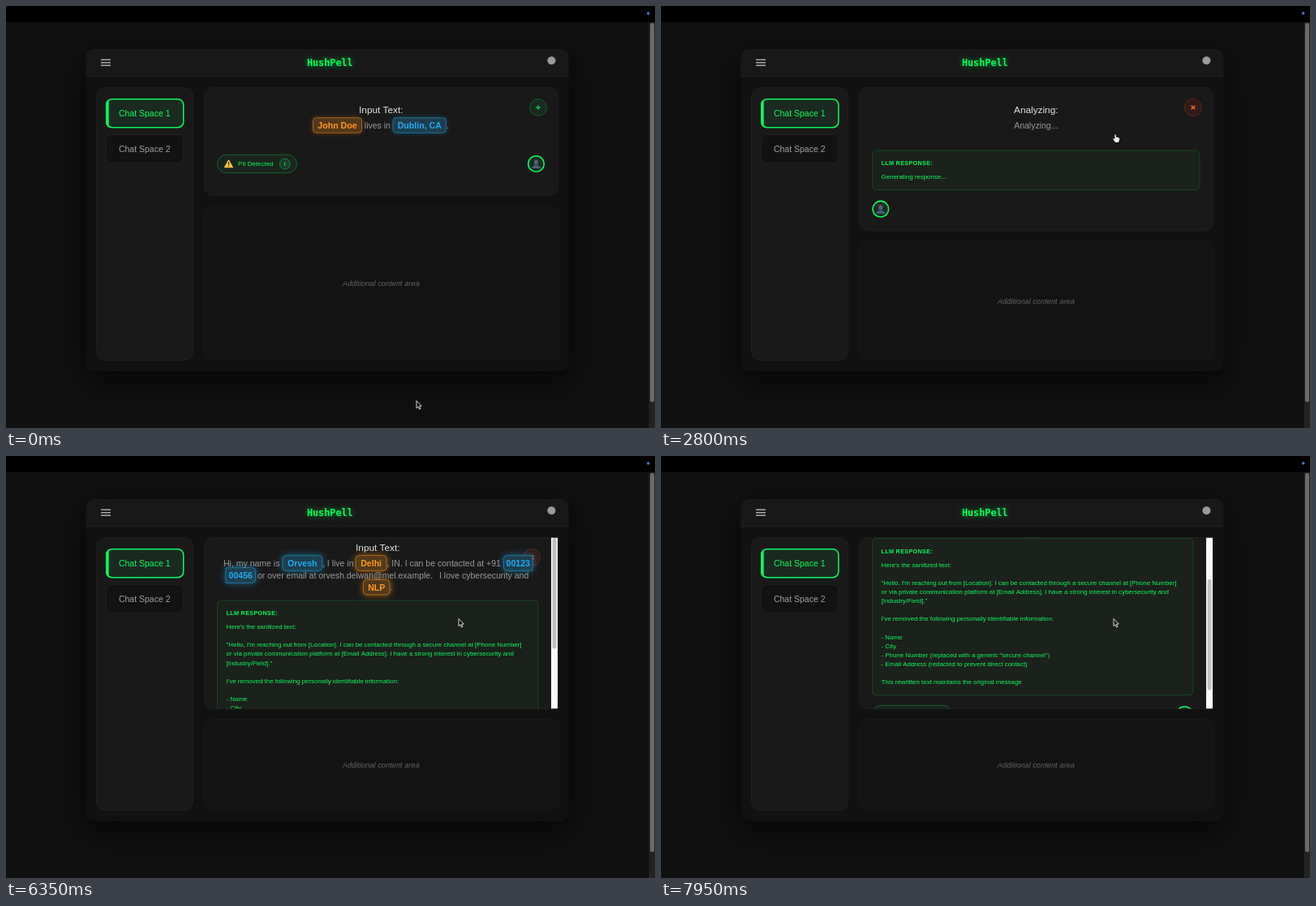
These frames come from a looping animation (800x520 px, 8 s). An HTML page with a canvas:

```html
<!DOCTYPE html>
<html lang="en">
<head>
<meta charset="utf-8">
<title>Privacy chat demo</title>
<style>
html, body { margin: 0; width: 100%; height: 100%; overflow: hidden; background: #101010; }
canvas { display: block; width: 800px; height: 520px; }
</style>
</head>
<body>
<canvas id="stage" width="800" height="520"></canvas>
<script>
const canvas = document.getElementById('stage');
const dpr = window.devicePixelRatio || 1;
canvas.width = 800 * dpr;
canvas.height = 520 * dpr;
const ctx = canvas.getContext('2d');

const LOOP = 8000, STEP = 50;
const FORM_AT = 1050, PASTE_AT = 2200, ANALYZE_AT = 2650, RESULT_AT = 5350;
const SCROLL_AT = 6400, SCROLL_END = 7850;
const SANS = '"Liberation Sans", Arial, sans-serif';
const MONO = '"DejaVu Sans Mono", monospace';
const GREEN = '#0cfa5c';
const green = a => `rgba(0,255,90,${a})`;
const ORANGE = [255, 152, 24], BLUE = [32, 172, 240];
const rgba = (c, a) => `rgba(${c},${a})`;

// Cursor stops: time, x, y
const PATH = [
  [50, 506, 486.5], [850, 656, 125], [1150, 656, 125], [1800, 516.5, 170],
  [2250, 560, 158], [3700, 560, 158], [4500, 558, 200.5]
];

const REPLY = [
  "Here's the sanitized text:", '',
  '"Hello, I\'m reaching out from [Location]. I can be contacted through a secure channel at [Phone Number]',
  'or via private communication platform at [Email Address]. I have a strong interest in cybersecurity and',
  '[Industry/Field]."', '',
  "I've removed the following personally identifiable information:", '',
  '- Name', '- City',
  '- Phone Number (replaced with a generic "secure channel")',
  '- Email Address (redacted to prevent direct contact)', '',
  'This rewritten text maintains the original message'
];

function box(x, y, w, h, r, fill, stroke, line = 1) {
  ctx.beginPath();
  ctx.roundRect(x, y, w, h, r);
  if (fill) { ctx.fillStyle = fill; ctx.fill(); }
  if (stroke) { ctx.strokeStyle = stroke; ctx.lineWidth = line; ctx.stroke(); }
}

function disc(x, y, r, fill, stroke, line = 1) {
  ctx.beginPath();
  ctx.arc(x, y, r, 0, Math.PI * 2);
  if (fill) { ctx.fillStyle = fill; ctx.fill(); }
  if (stroke) { ctx.strokeStyle = stroke; ctx.lineWidth = line; ctx.stroke(); }
}

// y is the middle of the capital letters
function text(str, x, y, size, color, { style = '', align = 'left', font = SANS, gap = 0 } = {}) {
  ctx.font = `${style} ${size}px ${font}`;
  ctx.letterSpacing = gap + 'px';
  ctx.textAlign = align;
  ctx.fillStyle = color;
  ctx.fillText(str, x, y + size * 0.36);
}

function glow(color, blur, draw) {
  ctx.save();
  ctx.shadowColor = color;
  ctx.shadowBlur = blur * dpr;
  draw();
  ctx.restore();
}

function lines(points, color, width) {
  ctx.beginPath();
  for (const [x1, y1, x2, y2] of points) { ctx.moveTo(x1, y1); ctx.lineTo(x2, y2); }
  ctx.strokeStyle = color;
  ctx.lineWidth = width;
  ctx.stroke();
}

function chip(str, left, right, y, color, strong, radii = 4) {
  const w = right - left;
  glow(rgba(color, strong ? 0.6 : 0.3), strong ? 10 : 7, () =>
    box(left, y - 9.3, w, 18.6, radii, strong ? '#1d1d1d' : '#1b1b1b'));
  box(left, y - 9.3, w, 18.6, radii, rgba(color, 0.24), rgba(color, 0.5));
  text(str, left + w / 2, y, 10.6, rgba(color, 1), { style: 'bold', align: 'center' });
}

function avatar(x, y) {
  disc(x, y, 9.8, '#1d2b24', GREEN, 1.6);
  ctx.fillStyle = '#4a6078';
  ctx.beginPath();
  ctx.ellipse(x, y - 2, 2.7, 3.3, 0, 0, Math.PI * 2);
  ctx.fill();
  ctx.beginPath();
  ctx.moveTo(x - 5.4, y + 5.6);
  ctx.quadraticCurveTo(x - 5, y + 2, x, y + 1.6);
  ctx.quadraticCurveTo(x + 5, y + 2, x + 5.4, y + 5.6);
  ctx.fill();
}

function badge(y) {
  box(260.5, y - 11.2, 98, 22.4, 11.2, '#1a251d', green(0.3));
  ctx.beginPath();
  ctx.moveTo(274.5, y - 4.4);
  ctx.lineTo(279.4, y + 4.2);
  ctx.lineTo(269.6, y + 4.2);
  ctx.closePath();
  ctx.lineJoin = 'round';
  ctx.fillStyle = ctx.strokeStyle = '#fbc63a';
  ctx.lineWidth = 1.2;
  ctx.fill();
  ctx.stroke();
  lines([[274.5, y - 2.2, 274.5, y + 1.4], [274.5, y + 2.4, 274.5, y + 3.6]], '#222', 1.2);
  text('PII Detected', 286, y, 7.9, GREEN);
  disc(343.8, y, 6.4, '#1d3a28', green(0.4));
  text('i', 343.8, y, 7.5, GREEN, { style: 'bold', align: 'center' });
}

function plusButton() {
  disc(656, 125, 10.4, '#1b2a20', green(0.28));
  lines([[653, 125, 659, 125], [656, 122, 656, 128]], GREEN, 1);
}

function closeButton(x) {
  disc(x, 125, 10.5, '#311a17', 'rgba(255,80,50,0.24)');
  lines([[x - 2.3, 122.7, x + 2.3, 127.3], [x + 2.3, 122.7, x - 2.3, 127.3]], '#e8702c', 1.5);
}

function backdrop() {
  ctx.fillStyle = '#101010';
  ctx.fillRect(0, 0, 800, 520);
  ctx.save();
  ctx.shadowColor = 'rgba(0,0,0,0.65)';
  ctx.shadowBlur = 40 * dpr;
  ctx.shadowOffsetY = 13 * dpr;
  box(98.5, 53, 595, 397, 10, '#111');
  ctx.restore();
  ctx.fillStyle = '#000';
  ctx.fillRect(0, 0, 800, 20);
  disc(791.7, 9, 1.8, '#4a72d8');
  ctx.fillStyle = '#232323';
  ctx.fillRect(792.5, 20, 7.5, 500);
  box(794, 21, 5, 467, 2.5, '#6a6a6a');

  box(98.5, 53, 595, 34, [10, 10, 0, 0], '#181818');
  lines([[98.5, 87, 693.5, 87]], '#202020', 1);
  lines([66.2, 69.7, 73.2].map(y => [117, y, 129, y]), '#a8a8a8', 1.4);
  glow(green(0.6), 7, () =>
    text('HushPell', 399.3, 69.8, 11.8, '#00ff5a', { style: 'bold', align: 'center', font: MONO }));
  disc(672.4, 67.3, 5, '#9a9a9a');
}

function sidebar() {
  box(111.5, 100.5, 119, 336, 10, '#191919', '#1e1e1e');
  box(123.8, 114.7, 95, 35, 7, '#1a2a20', GREEN, 1.5);
  ctx.save();
  ctx.beginPath();
  ctx.roundRect(123, 114, 96.5, 36.4, 7.5);
  ctx.clip();
  ctx.fillStyle = GREEN;
  ctx.fillRect(123, 114, 3.7, 37);
  ctx.restore();
  text('Chat Space 1', 170.7, 132.2, 10.5, GREEN, { align: 'center' });
  box(123.5, 158.5, 95, 35, 7, '#121212', '#1f1f1f');
  text('Chat Space 2', 170.7, 176, 10.5, '#a0a0a0', { align: 'center' });
}

function panels(bottom) {
  const top = bottom + 13;
  box(244.5, 100.5, 436, bottom - 100.5, 10, '#191919', '#1e1e1e');
  box(244.5, top, 436, 436.5 - top, 10, '#131313', '#181818');
  text('Additional content area', 462.3, (top + 436.5) / 2 + 0.2, 9.3, '#626262',
    { style: 'italic', align: 'center' });
}

function heading(str, x, y) {
  text(str, x, y, 11.8, '#e2e2e2', { align: 'center' });
}

function startView() {
  panels(233);
  heading('Input Text:', 462.3, 128);
  chip('John Doe', 378.5, 438.5, 147, ORANGE, false);
  text('lives in', 441.8, 147, 10.5, '#999');
  chip('Dublin, CA', 477, 542.5, 147, BLUE, false);
  text('.', 543, 147, 10.5, '#999');
  plusButton();
  badge(194.5);
  avatar(653.5, 194.5);
}

function formView(t) {
  panels(233);
  text('Enter text to analyze for PII:', 462.3, 124.2, 10.5, '#a0a0a0', { align: 'center' });
  box(330.5, 143.5, 207, 25, 5, '#1f2420', green(0.7));
  ctx.save();
  ctx.beginPath();
  ctx.rect(339.5, 144, 188.5, 24);
  ctx.clip();
  if (t < PASTE_AT) text("Hi, I'm John Doe from New York. Call me at 555", 339.5, 156.2, 9.2, '#8d918e');
  else text('delwan@mel.example. I love cybersecurity and NLP.', 527.5, 156.2, 9.2, '#e2e2e2', { align: 'right' });
  ctx.restore();
  box(545.7, 143.8, 48.6, 24.4, 5, '#00ff5c');
  text('Send', 570, 156.2, 9.2, '#0c1a10', { style: 'bold', align: 'center' });
  closeButton(656);
  avatar(270.8, 193.8);
}

function replyBox(width, height) {
  box(260.5, 178, width, height, 4.5, '#1b211b', green(0.19));
  text('LLM RESPONSE:', 271.5, 193.8, 7.2, GREEN, { style: 'bold', gap: 0.34 });
}

function analyzeView() {
  panels(277);
  heading('Analyzing:', 462.3, 128);
  text('Analyzing...', 462.3, 147, 10.5, '#999', { align: 'center' });
  replyBox(403.5, 48.5);
  text('Generating response...', 271.5, 210.2, 7.9, GREEN);
  closeButton(656);
  avatar(270.8, 250.2);
}

function scrollAt(t) {
  if (t < SCROLL_AT) return 0;
  const decay = u => 1 - Math.exp(-u / 360);
  const span = SCROLL_END - SCROLL_AT;
  return 76.5 * decay(Math.min(t - SCROLL_AT, span)) / decay(span);
}

function resultView(t) {
  const scroll = scrollAt(t), gray = '#999';
  panels(311.5);
  ctx.save();
  ctx.beginPath();
  ctx.roundRect(244.5, 100.5, 436, 211, [10, 0, 0, 10]);
  ctx.clip();
  ctx.save();
  ctx.translate(0, -scroll);
  closeButton(648);
  heading('Input Text:', 458.3, 113.2);
  chip('Orvesh', 341, 389.5, 132, BLUE, true);
  chip('Delhi', 431.2, 469, 132, ORANGE, true);
  chip('00123', 613.5, 649, 132, BLUE, true, [4, 0, 0, 4]);
  chip('00456', 271, 307.5, 147, BLUE, true, [0, 4, 4, 0]);
  chip('NLP', 440.5, 473, 161.7, ORANGE, true);
  text('Hi, my name is', 268, 132, 10.5, gray);
  text(', I live in', 390, 132, 10.5, gray);
  text(', IN. I can be contacted at +91', 469.5, 132, 10.5, gray);
  text('or over email at orvesh.delwan@mel.example.', 310, 147, 10.5, gray);
  text('I love cybersecurity and', 644.3, 147, 10.5, gray, { align: 'right' });
  text('.', 473.8, 161.7, 10.5, gray);
  replyBox(395.5, 193);
  REPLY.forEach((row, i) => text(row, 271.5, 210.2 + i * 11.13, 7.9, GREEN));
  badge(395);
  avatar(645.5, 395);
  ctx.restore();
  ctx.fillStyle = '#fafafa';
  ctx.fillRect(672, 100.5, 8, 211);
  box(673.6, 101 + scroll * 0.667, 5, 136.5, 2.5, '#c1c1c1');
  ctx.restore();
}

function arrow(x, y) {
  ctx.save();
  ctx.translate(x, y);
  ctx.beginPath();
  [[0, 0], [0, 9], [2, 7.2], [3.5, 10.4], [4.9, 9.8], [3.5, 6.7], [6.2, 6.5]]
    .forEach(p => ctx.lineTo(...p));
  ctx.closePath();
  ctx.fillStyle = '#080808';
  ctx.fill();
  ctx.strokeStyle = '#f2f2f2';
  ctx.lineWidth = 0.9;
  ctx.stroke();
  ctx.restore();
}

function hand(x, y) {
  ctx.save();
  ctx.translate(x, y);
  ctx.beginPath();
  [[-0.9, 0.6], [0.6, 0.4], [1, 3.4], [4.6, 4.2], [5.2, 6.2], [4, 10], [0, 10], [-2.8, 6], [-2.2, 5.1], [-0.4, 6]]
    .forEach(p => ctx.lineTo(...p));
  ctx.closePath();
  ctx.lineJoin = 'round';
  ctx.strokeStyle = '#0a0a0a';
  ctx.lineWidth = 1.2;
  ctx.stroke();
  ctx.fillStyle = '#f2f2f2';
  ctx.fill();
  ctx.restore();
}

function cursor(t) {
  let [, x, y] = t < PATH[0][0] ? PATH[0] : PATH[PATH.length - 1];
  for (let i = 1; i < PATH.length; i++) {
    const [t0, x0, y0] = PATH[i - 1], [t1, x1, y1] = PATH[i];
    if (t < t0 || t > t1) continue;
    const u = (t - t0) / (t1 - t0), e = u * u * (3 - 2 * u);
    x = x0 + (x1 - x0) * e;
    y = y0 + (y1 - y0) * e;
    break;
  }
  const pointing = (t >= 800 && t < 1250) || (t >= 2150 && t <= 3700);
  (pointing ? hand : arrow)(x, y);
}

function render() {
  const t = Math.floor((performance.now() % LOOP) / STEP) * STEP;
  ctx.setTransform(dpr, 0, 0, dpr, 0, 0);
  backdrop();
  sidebar();
  if (t < FORM_AT) startView();
  else if (t < ANALYZE_AT) formView(t);
  else if (t < RESULT_AT) analyzeView();
  else resultView(t);
  cursor(t);
  requestAnimationFrame(render);
}
render();
</script>
</body>
</html>
```
